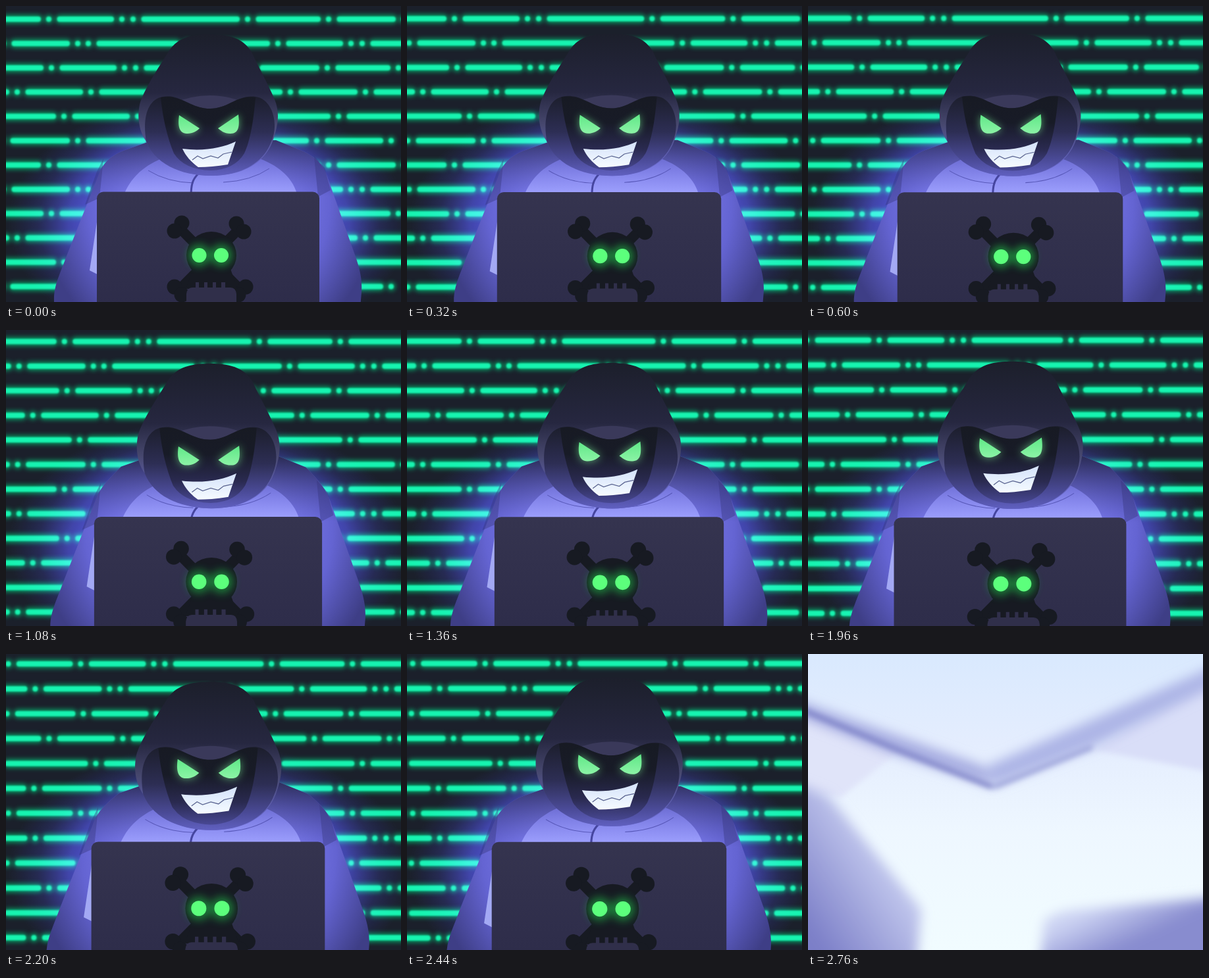
Animation of 600 by 450 pixels, one loop 2800 ms. Source, as an HTML page:

```html
<!DOCTYPE html>
<html lang="en">
<head>
<meta charset="utf-8">
<title>Hooded figure</title>
<style>
html, body { margin: 0; width: 100%; height: 100%; overflow: hidden; background: #1b202b; }
svg { display: block; width: 600px; height: 450px; }
#halo { mix-blend-mode: screen; }
</style>
</head>
<body>
<svg viewBox="0 0 600 450">
  <defs>
    <filter id="soft" filterUnits="userSpaceOnUse" x="-20" y="-20" width="640" height="490"><feGaussianBlur stdDeviation="3.500"/></filter>
    <filter id="edge" filterUnits="userSpaceOnUse" x="-20" y="-20" width="640" height="490"><feGaussianBlur stdDeviation="1"/></filter>
    <filter id="glow" x="-60%" y="-60%" width="220%" height="220%"><feGaussianBlur stdDeviation="6"/></filter>
    <filter id="haze" filterUnits="userSpaceOnUse" x="-80" y="-80" width="760" height="610"><feGaussianBlur stdDeviation="9"/></filter>
    <filter id="thin" filterUnits="userSpaceOnUse" x="-80" y="-80" width="760" height="610"><feGaussianBlur stdDeviation="4"/></filter>
    <radialGradient id="haloFill">
      <stop offset=".5" stop-color="#4a4af0"/><stop offset=".7" stop-color="#3c3cd8" stop-opacity=".7"/>
      <stop offset=".85" stop-color="#3030c0" stop-opacity=".25"/><stop offset="1" stop-color="#2020a0" stop-opacity="0"/>
    </radialGradient>
    <radialGradient id="bodyFill" gradientUnits="userSpaceOnUse" cx="308" cy="300" r="255">
      <stop offset="0" stop-color="#9c9eff"/><stop offset=".45" stop-color="#7c7cee"/>
      <stop offset=".72" stop-color="#6464d2"/><stop offset="1" stop-color="#3e3e86"/>
    </radialGradient>
    <linearGradient id="bodyShade" gradientUnits="userSpaceOnUse" x1="0" y1="195" x2="0" y2="290">
      <stop offset="0" stop-color="#25264a" stop-opacity=".9"/><stop offset="1" stop-color="#3a3a90" stop-opacity="0"/>
    </linearGradient>
    <linearGradient id="chestFill" gradientUnits="userSpaceOnUse" x1="0" y1="230" x2="0" y2="288">
      <stop offset="0" stop-color="#7676e4" stop-opacity=".7"/><stop offset="1" stop-color="#a0a3ff"/>
    </linearGradient>
    <linearGradient id="hoodFill" gradientUnits="userSpaceOnUse" x1="0" y1="43" x2="0" y2="240">
      <stop offset="0" stop-color="#1c1f2b"/><stop offset=".45" stop-color="#262740"/>
      <stop offset=".7" stop-color="#47486f"/><stop offset="1" stop-color="#6666c6"/>
    </linearGradient>
    <linearGradient id="rimFill" gradientUnits="userSpaceOnUse" x1="0" y1="137" x2="0" y2="258">
      <stop offset="0" stop-color="#1c1e2c"/><stop offset=".45" stop-color="#2d2e54"/>
      <stop offset=".8" stop-color="#4b4b98"/><stop offset="1" stop-color="#6060c0"/>
    </linearGradient>
    <linearGradient id="faceFill" gradientUnits="userSpaceOnUse" x1="0" y1="138" x2="0" y2="252">
      <stop offset="0" stop-color="#171a23"/><stop offset=".35" stop-color="#181b27"/>
      <stop offset=".7" stop-color="#2a2a50"/><stop offset="1" stop-color="#4a4a98"/>
    </linearGradient>
    <linearGradient id="eyeFill" x1="0" y1="0" x2="0" y2="1">
      <stop offset="0" stop-color="#5fe887"/><stop offset="1" stop-color="#8cf3a6"/>
    </linearGradient>
    <linearGradient id="mouthFill" x1="0" y1="0" x2="0" y2="1">
      <stop offset="0" stop-color="#d4e2fb"/><stop offset="1" stop-color="#f6fbff"/>
    </linearGradient>
    <linearGradient id="lidFill" x1="0" y1="0" x2="0" y2="1">
      <stop offset="0" stop-color="#35344f"/><stop offset="1" stop-color="#2c2b49"/>
    </linearGradient>
    <linearGradient id="closeFill" x1="0" y1="0" x2="0" y2="1">
      <stop offset="0" stop-color="#d9e9fe"/><stop offset=".3" stop-color="#e4edfe"/>
      <stop offset=".6" stop-color="#eef7ff"/><stop offset="1" stop-color="#f1fcff"/>
    </linearGradient>
    <linearGradient id="cornerL" gradientUnits="userSpaceOnUse" x1="0" y1="420" x2="130" y2="330">
      <stop offset="0" stop-color="#7c7fc8"/><stop offset="1" stop-color="#c3c9ee"/>
    </linearGradient>
    <linearGradient id="cornerR" gradientUnits="userSpaceOnUse" x1="440" y1="385" x2="470" y2="450">
      <stop offset="0" stop-color="#cdd4f3"/><stop offset="1" stop-color="#888ccf"/>
    </linearGradient>
  </defs>

  <g id="scene">
    <rect width="600" height="450" fill="#1b202b"/>
    <g fill="none" stroke-linecap="round">
      <path class="code" stroke="#00c878" stroke-width="13" opacity=".75" filter="url(#soft)"/>
      <path class="code" stroke="#16f4b0" stroke-width="8" filter="url(#edge)"/>
    </g>
    <ellipse id="halo" cx="308" cy="330" rx="305" ry="195" fill="url(#haloFill)"/>

    <g id="figure">
      <path class="body" fill="url(#bodyFill)"/>
      <path class="body" fill="url(#bodyShade)"/>
      <path d="M178 290C188 262 208 244 236 232Q310 275 385 232C418 244 438 265 443 290Z" fill="url(#chestFill)"/>
      <path d="M148 232L138 252L120 302L142 292ZM468 228L484 246L493 280L474 290Z" fill="#35357c" opacity=".4"/>
      <path d="M216 250Q245 268 285 269M330 268Q372 266 400 247" fill="none" stroke="#5757b8"/>
      <path id="cuff" d="M139 322L127 402L139 408Z" fill="#a3a9f4"/>

      <g id="hood">
        <path d="M292 255C283 264 281 272 281 290" fill="none" stroke="#4646a0" stroke-width="3"/>
        <path d="M213 206C202 190 199 170 203 150C208 130 230 96 244 74C258 47 283 43 310 43C345 43 362 52 373 70C382 90 398 118 408 142C416 162 414 180 405 206C390 245 350 258 312 258C270 258 228 240 213 206Z" fill="url(#hoodFill)"/>
        <path d="M250 150Q278 136 310 136Q342 136 366 150L310 165Z" fill="#3a395a"/>
        <path d="M213 206C207 170 215 142 238 138C265 133 280 156 310 156C338 156 352 134 380 138C405 142 415 180 403 206C390 243 350 258 312 258C270 258 228 243 213 206Z" fill="url(#rimFill)"/>
        <path d="M235 139C265 133 280 156 310 156C338 156 352 134 379 139C376 175 371 205 362 224Q347 249 311 250Q271 249 255 224C245 200 238 170 235 139Z" fill="url(#faceFill)"/>
      </g>

      <g id="face">
        <g fill="#35e070" opacity=".65" filter="url(#glow)"><use href="#eyes"/></g>
        <path id="eyes" d="M263 166C261 180 262 194 275 194C284 194 290 190 294 186ZM353 165C355 182 354 194 341 194C331 194 326 189 322 186Z" fill="url(#eyeFill)"/>
        <path d="M268 217C300 221 328 216 349 206L337 241Q312 245 292 245C281 237 273 228 268 217Z" fill="url(#mouthFill)"/>
        <path d="M283 234L291 228L299 232L311 228L322 231L330 225L343 222" fill="none" stroke="#59638f" stroke-width="1.2"/>
      </g>

      <rect x="138" y="282.5" width="338" height="200" rx="10" fill="url(#lidFill)"/>
      <g fill="#171a22">
        <path d="M262 336L358 433M356 337L261 433" stroke="#171a22" stroke-width="15"/>
        <g id="knobs"></g>
        <ellipse cx="312" cy="379" rx="38" ry="36"/>
        <path d="M284 400H341L352 430H273Z"/>
      </g>
      <path d="M274 460V438Q275 428 283 428H288V420H293V428H301V420H306V428H314V420H319V428H327V420H333V428H341Q349 428 350 438V460Z" fill="#302f4a"/>
      <g fill="#22d850" opacity=".5" filter="url(#glow)"><circle cx="293.500" cy="379" r="17"/><circle cx="327" cy="379" r="17"/></g>
      <g fill="#5cff7c"><circle cx="293.500" cy="379" r="11"/><circle cx="327" cy="379" r="11"/></g>
    </g>
  </g>

  <g id="close">
    <rect width="600" height="450" fill="url(#closeFill)"/>
    <g filter="url(#thin)">
      <path d="M-40 70L135 150L50 218L-40 205Z" fill="#e0e4f9"/>
      <path d="M435 146L640 20V185Z" fill="#d9def8"/>
    </g>
    <g filter="url(#haze)">
      <path d="M-40 62L265 170L283 202L120 148L-40 85Z" fill="#a5abe0"/>
      <path d="M268 172L640 8V38L435 140L284 200Z" fill="#adb5e6"/>
      <path d="M-60 180L30 215L172 388L162 500H-60Z" fill="url(#cornerL)"/>
      <path d="M358 408Q370 392 410 388L660 366V500H350Z" fill="url(#cornerR)"/>
    </g>
    <g filter="url(#thin)" fill="none" stroke-width="7">
      <path d="M-20 80L130 143L280 202" stroke="#7c80c6"/>
      <path d="M282 202L432 141" stroke="#9ba2d9"/>
    </g>
  </g>
</svg>
<script>
const LOOP = 2800, STEP = 40;
const $ = id => document.getElementById(id);
const setAll = (cls, d) => document.querySelectorAll(cls).forEach(p => p.setAttribute('d', d));
const move = (id, y) => $(id).setAttribute('transform', `translate(0 ${y})`);
const ramp = (t, a, b) => Math.min(1, Math.max(0, (t - a) / (b - a)));
const ease = (t, a, b) => { const u = ramp(t, a, b); return u * u * (3 - 2 * u); };
const zoom = (s, x, y) => `translate(${x} ${y}) scale(${s}) translate(${-x} ${-y})`;

// Dot positions per row; dashes fill the wide gaps between dots.
const ROWS = [
  [-45, 65, 176, 193, 367, 490, 604],
  [-4, 109, 125, 275, 292, 413, 524, 541, 655],
  [-47, 69, 180, 197, 373, 488, 596],
  [17, 129, 245, 432, 546, 660],
  [-63, 88, 200, 370, 505, 640],
  [-6, 109, 225, 350, 472, 585]
];

$('knobs').innerHTML = [[267, 330], [256, 342], [350, 331], [361, 343], [256, 427], [267, 439], [364, 427], [353, 439]]
  .map(([x, y]) => `<circle cx="${x}" cy="${y}" r="11.500"/>`).join('');

function codeRows(sec) {
  let d = '';
  for (let i = 0; i < 12; i++) {
    const y = 225 + (20 + 36.95 * i - 225) * (1 + 0.011 * sec);
    const dots = [-150, ...ROWS[i % 6]].map(x => x + sec * (x < 300 ? 22 : 16.5));
    dots.forEach((x, j) => {
      d += `M${x} ${y}h.01`;
      const next = dots[j + 1];
      if (next - x > 40) d += `M${x + 16.5} ${y}H${next - 16}`;
    });
  }
  return d;
}

function draw(t) {
  const sec = t / 1000;
  const bow = ease(t, 560, 1040) - 0.85 * ease(t, 2020, 2420);
  const lift = ease(t, 1140, 1560);
  const sh = 207 - 12 * bow;

  setAll('.code', codeRows(sec));
  setAll('.body', `M73 450C72 425 82 408 92 380L140 258C146 240 158 228 178 ${sh + 13}L215 ${sh}` +
    `L410 ${sh - 3}L452 ${sh + 14}C475 232 484 245 490 265L520 350C532 385 542 405 540 435L538 460H73Z`);
  move('hood', 12 * bow);
  move('face', 12 * bow - 11 * lift);
  move('cuff', -16 * bow);
  $('figure').setAttribute('transform', zoom(1 + 0.0225 * sec, 307.5, 222));

  // Final rush into the teeth.
  const rush = ramp(t, 2560, 2760);
  $('scene').setAttribute('transform', zoom(Math.exp(3.3 * rush ** 3), 309, 218));
  $('scene').style.display = rush < 1 ? '' : 'none';
  const veil = ramp(t, 2680, 2760);
  $('close').style.display = veil ? '' : 'none';
  $('close').style.opacity = veil;
}

const start = performance.now();
function tick() {
  const t = (performance.now() - start) % LOOP;
  draw(Math.floor(t / STEP) * STEP);
  requestAnimationFrame(tick);
}
tick();
</script>
</body>
</html>
```
